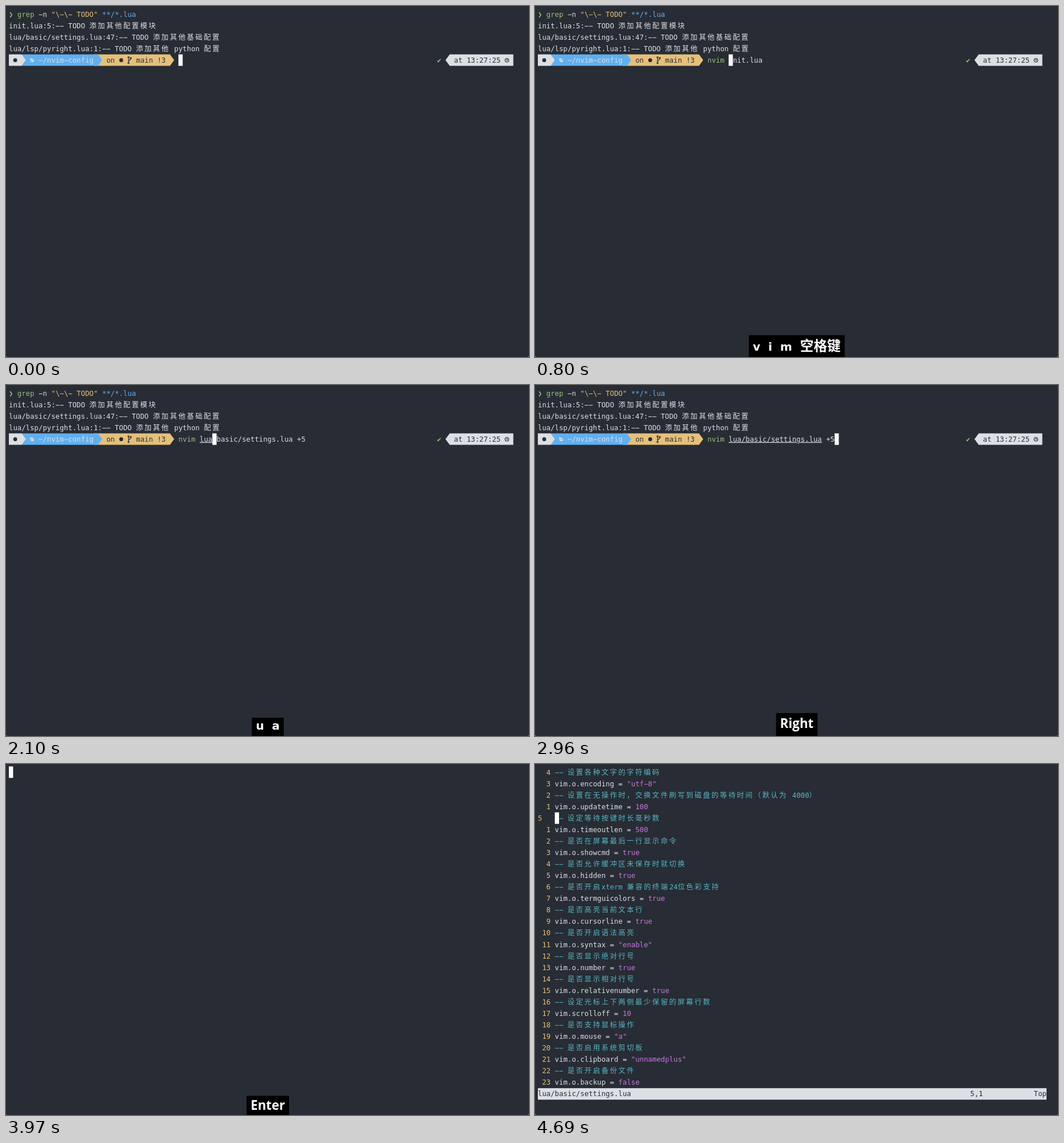
Write an HTML page that moves like this. It is 913 by 613 pixels and loops after 5290 ms.

```html
<!DOCTYPE html>
<html lang="zh-CN">
<head>
<meta charset="utf-8">
<title>Terminal session</title>
<style>
  html, body { margin: 0; width: 100%; height: 100%; overflow: hidden; background: #85878c; }
  svg { display: block; width: 913px; height: 613px; background: #282c34; border-radius: 0 0 3px 3px; }
  text { white-space: pre; font: 12.29px "DejaVu Sans Mono", monospace; }
  .wide { font-family: "Noto Sans CJK SC", "Noto Sans CJK", sans-serif; letter-spacing: 2.5px; }
  .path { text-decoration: underline; }
  .keys { font: bold 20px "DejaVu Sans", sans-serif; }
  .named { font: bold 22.3px "Open Sans", "Noto Sans", sans-serif; }
  .space { font: bold 23.6px "Noto Sans CJK SC", "Noto Sans CJK", sans-serif; }
</style>
</head>
<body>
<svg viewBox="0 0 913 613"><g id="screen"></g><g id="caption"></g></svg>
<script>
const LOOP = 5290, CELL = 7.4, ROW = 20.07, LEFT = 5, TOP = 4.2;
const C = {
  bg: '#282c34', fg: '#dcdfe4', red: '#e06c75', green: '#98c379', yellow: '#e5c07b',
  blue: '#61afef', magenta: '#c678dd', cyan: '#56b6c2', white: '#fff'
};
const screen = document.getElementById('screen');
const caption = document.getElementById('caption');

const x = col => LEFT + col * CELL;
const y = row => TOP + row * ROW;

function add(parent, tag, attrs, content = '') {
  const el = document.createElementNS('http://www.w3.org/2000/svg', tag);
  for (const [key, value] of Object.entries(attrs)) el.setAttribute(key, value);
  el.textContent = content;
  parent.append(el);
  return el;
}

// Writes on the cell grid; CJK characters take two cells. Returns the next column.
function write(row, col, string, fill = C.fg, cls = '') {
  for (const run of string.match(/[\u3000-\u9fff\uff00-\uffef]+|[^\u3000-\u9fff\uff00-\uffef]+/g) || []) {
    const wide = run.charCodeAt(0) >= 0x3000 && run.charCodeAt(0) !== 0x276f;
    // The terminal face has hyphens as long as a minus sign.
    add(screen, 'text', { x: x(col), y: y(row) + 14.3, fill, class: wide ? 'wide' : cls },
      run.replaceAll('-', '\u2212'));
    col += run.length * (wide ? 2 : 1);
  }
  return col;
}

const bar = (row, from, to, fill) =>
  add(screen, 'rect', { x: x(from), y: y(row), width: (to - from) * CELL, height: ROW, fill });
const cursor = (row, col) => bar(row, col, col + 1, C.white);
const dot = (row, col) =>
  add(screen, 'circle', { cx: x(col + .5), cy: y(row) + 10.2, r: 3.4, fill: C.bg });

// Segment with a triangular tip one cell long; a negative tip points left.
function segment(row, from, to, tip, fill) {
  const t = y(row), b = t + ROW, m = t + ROW / 2;
  const [back, front] = tip > 0 ? [from, to] : [to, from];
  add(screen, 'path', { fill, d: `M${x(back)} ${t}H${x(front)}L${x(front + tip)} ${m}L${x(front)} ${b}H${x(back)}Z` });
}

function icon(row, col, d, color, filled) {
  add(screen, 'path', {
    d, transform: `translate(${x(col)} ${y(row)})`,
    fill: filled ? color : 'none', stroke: filled ? 'none' : color, 'stroke-width': 1.2
  });
}

function history() {
  write(0, 0, '❯ grep', C.green);
  write(0, 7, '-n');
  write(0, 10, '"\\-\\- TODO"', C.yellow);
  write(0, 22, '**/*.lua', C.blue);
  write(1, 0, 'init.lua:5:-- TODO 添加其他配置模块');
  write(2, 0, 'lua/basic/settings.lua:47:-- TODO 添加其他基础配置');
  write(3, 0, 'lua/lsp/pyright.lua:1:-- TODO 添加其他 python 配置');
}

function promptBar() {
  segment(4, 20, 38, 1, C.yellow);
  segment(4, 3, 21, 1, C.blue);
  segment(4, 0, 3, 1, C.fg);
  dot(4, 1);
  icon(4, 5, 'M0 7h2.6l1 1h2.4v1.6H2.4L.9 12.6ZM2.8 10.2H7.4L6 13.5H1.2Z', C.fg, true);
  write(4, 7, '~/nvim-config', C.fg);
  write(4, 23, 'on', C.bg);
  dot(4, 26);
  icon(4, 28, 'M1.7 6.4V14M1.7 12.4C1.7 10 5.6 11 5.6 7.6M.6 5.2a1.1 1.1 0 1 0 2.2 0a1.1 1.1 0 1 0-2.2 0' +
    'M.6 15a1.1 1.1 0 1 0 2.2 0a1.1 1.1 0 1 0-2.2 0M4.5 6.5a1.1 1.1 0 1 0 2.2 0a1.1 1.1 0 1 0-2.2 0', C.bg);
  write(4, 30, 'main !3', C.bg);
  write(4, 101, '✔', C.green);
  segment(4, 104, 119, -1, C.fg);
  write(4, 105, 'at 13:27:25', C.bg);
  icon(4, 117, 'M.5 10.2a3.2 3.2 0 1 0 6.4 0a3.2 3.2 0 1 0-6.4 0M3.7 8.2V10.4H5.2', C.bg);
}

function command(col, row, cmd, arg = '') {
  const [path, line] = arg.split(' ');
  col = write(row, col, cmd, cmd === 'nvim ' ? C.green : C.red);
  col = write(row, col, path, C.fg, 'path');
  return line ? write(row, col, ' ' + line) : col;
}

const editing = (cmd = '', arg = '', hint = '') => () => {
  history();
  promptBar();
  const col = command(40, 4, cmd, arg);
  write(4, col, hint);
  cursor(4, col);
};

const TARGET = 'lua/basic/settings.lua +5';
const typedArg = n => editing('nvim ', TARGET.slice(0, n), TARGET.slice(n));

function submitted() {
  history();
  write(4, 0, '❯', C.green);
  command(2, 4, 'nvim ', TARGET);
  cursor(5, 0);
}

const SETTINGS = `-- 设置各种文字的字符编码
vim.o.encoding = "utf-8"
-- 设置在无操作时，交换文件刷写到磁盘的等待时间（默认为 4000）
vim.o.updatetime = 100
-- 设定等待按键时长毫秒数
vim.o.timeoutlen = 500
-- 是否在屏幕最后一行显示命令
vim.o.showcmd = true
-- 是否允许缓冲区未保存时就切换
vim.o.hidden = true
-- 是否开启xterm 兼容的终端24位色彩支持
vim.o.termguicolors = true
-- 是否高亮当前文本行
vim.o.cursorline = true
-- 是否开启语法高亮
vim.o.syntax = "enable"
-- 是否显示绝对行号
vim.o.number = true
-- 是否显示相对行号
vim.o.relativenumber = true
-- 设定光标上下两侧最少保留的屏幕行数
vim.scrolloff = 10
-- 是否支持鼠标操作
vim.o.mouse = "a"
-- 是否启用系统剪切板
vim.o.clipboard = "unnamedplus"
-- 是否开启备份文件
vim.o.backup = false`.split('\n');

function editor() {
  const current = 4;
  SETTINGS.forEach((line, row) => {
    const number = row === current ? '5' : String(Math.abs(row - current)).padStart(3);
    write(row, 0, number, C.yellow);
    if (line.startsWith('--')) {
      write(row, 4, line, C.cyan);
    } else {
      const split = line.indexOf('= ') + 2;
      write(row, write(row, 4, line.slice(0, split)), line.slice(split), C.magenta);
    }
  });
  cursor(current, 4);
  bar(28, 0, 120, C.fg);
  write(28, 0, 'lua/basic/settings.lua', C.bg);
  write(28, 102, '5,1', C.bg);
  write(28, 117, 'Top', C.bg);
}

const blank = () => {};
const emptyScreen = () => cursor(0, 0);

const SPACE = '空格键';
const NAMED = { Right: { top: 573, base: 598.5 }, Enter: { top: 579.5, base: 604 } };

function showKeys(keys) {
  caption.replaceChildren();
  if (!keys) return;
  const named = NAMED[keys];
  const hasSpace = keys.includes(SPACE);
  const top = named ? named.top : hasSpace ? 575 : 581;
  const box = add(caption, 'rect', { y: top, height: 613 - top });
  const label = add(caption, 'text', {
    x: 457, y: named ? named.base : 602, fill: C.white, 'text-anchor': 'middle', class: named ? 'named' : 'keys'
  });
  if (named) {
    label.textContent = keys;
  } else {
    add(label, 'tspan', {}, keys.replace(SPACE, '').replaceAll(' ', '  '));
    if (hasSpace) add(label, 'tspan', { class: 'space' }, SPACE);
  }
  const width = label.getComputedTextLength() + 14;
  box.setAttribute('x', 457 - width / 2);
  box.setAttribute('width', width);
}

const suggested = editing('nvim ', '', 'init.lua');
const accepted = typedArg(TARGET.length);

// Start time in ms, keys in the caption, terminal picture.
const STEPS = [
  [0, '', editing()],
  [130, 'n', editing()],
  [270, 'n', editing('n')],
  [350, 'n v', editing('n')],
  [430, 'n v i', editing('nv')],
  [520, 'n v i m', editing('nvi')],
  [600, 'v i m ' + SPACE, editing('nvim')],
  [800, 'v i m ' + SPACE, suggested],
  [1190, 'i m ' + SPACE, suggested],
  [1290, 'm ' + SPACE, suggested],
  [1390, SPACE, suggested],
  [1550, '', suggested],
  [1690, 'l', suggested],
  [1770, 'l', typedArg(1)],
  [1850, 'l u', typedArg(1)],
  [1940, 'l u', typedArg(2)],
  [2020, 'u a', typedArg(2)],
  [2100, 'u a', typedArg(3)],
  [2830, 'Right', typedArg(3)],
  [2960, 'Right', accepted],
  [3760, 'Enter', accepted],
  [3830, 'Enter', submitted],
  [3900, 'Enter', blank],
  [3970, 'Enter', emptyScreen],
  [4040, 'Enter', editor],
  [4690, '', editor]
];

const start = performance.now();
let shown = null;

function tick() {
  const time = (performance.now() - start) % LOOP;
  const step = STEPS.findLast(([from]) => from <= time);
  if (step !== shown) {
    shown = step;
    screen.replaceChildren();
    step[2]();
    showKeys(step[1]);
  }
  requestAnimationFrame(tick);
}
tick();
</script>
</body>
</html>
```
